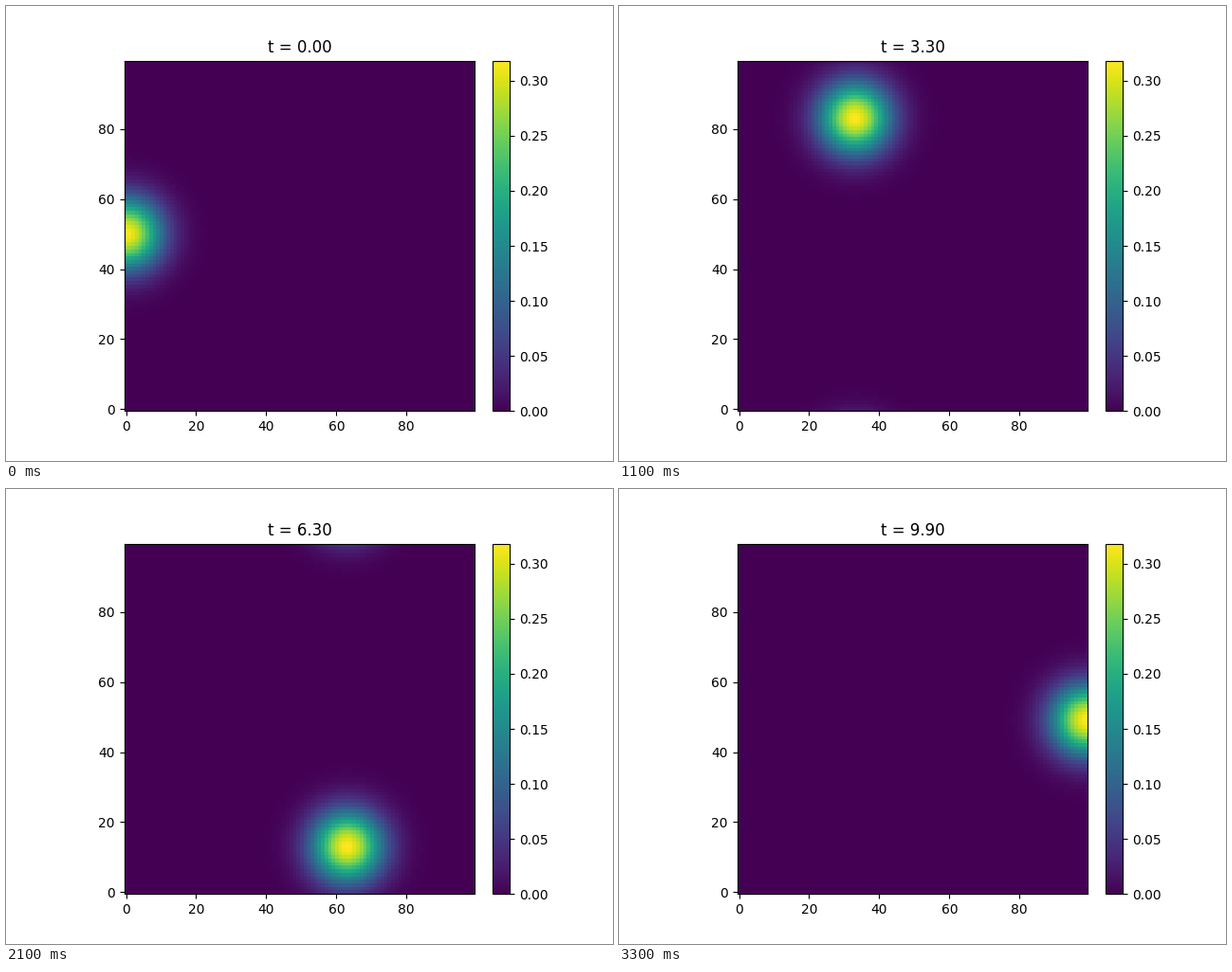
Animation, 640 px wide and 480 px high, one loop 3.4 s. Source, as a matplotlib script:

```python
import numpy as np
import matplotlib.pyplot as plt
from matplotlib.animation import FuncAnimation
from mpl_toolkits.axes_grid1 import make_axes_locatable

N = 100          # cells per side
L = 10.0         # side length
FRAMES = 34
DT = 0.3

axis = np.arange(N) * L / N
X, Y = np.meshgrid(axis, axis)


def density(t):
    """Gaussian packet moving diagonally, periodic in y only."""
    dx = X - t
    dy = (Y - L / 2 - t + L / 2) % L - L / 2
    return np.exp(-dx**2 - dy**2) / np.pi


fig, ax = plt.subplots(figsize=(6.4, 4.8), dpi=100)
image = ax.imshow(density(0), origin="lower", cmap="viridis",
                  vmin=0, vmax=1 / np.pi)
title = ax.set_title("t = 0.00")
cax = make_axes_locatable(ax).append_axes("right", size="5%", pad="5%")
fig.colorbar(image, cax=cax)


def update(i):
    t = i * DT
    image.set_data(density(t))
    title.set_text(f"t = {t:.2f}")
    return image, title


anim = FuncAnimation(fig, update, frames=FRAMES, interval=100,
                     repeat=True, repeat_delay=0, blit=False)
plt.show()
```
